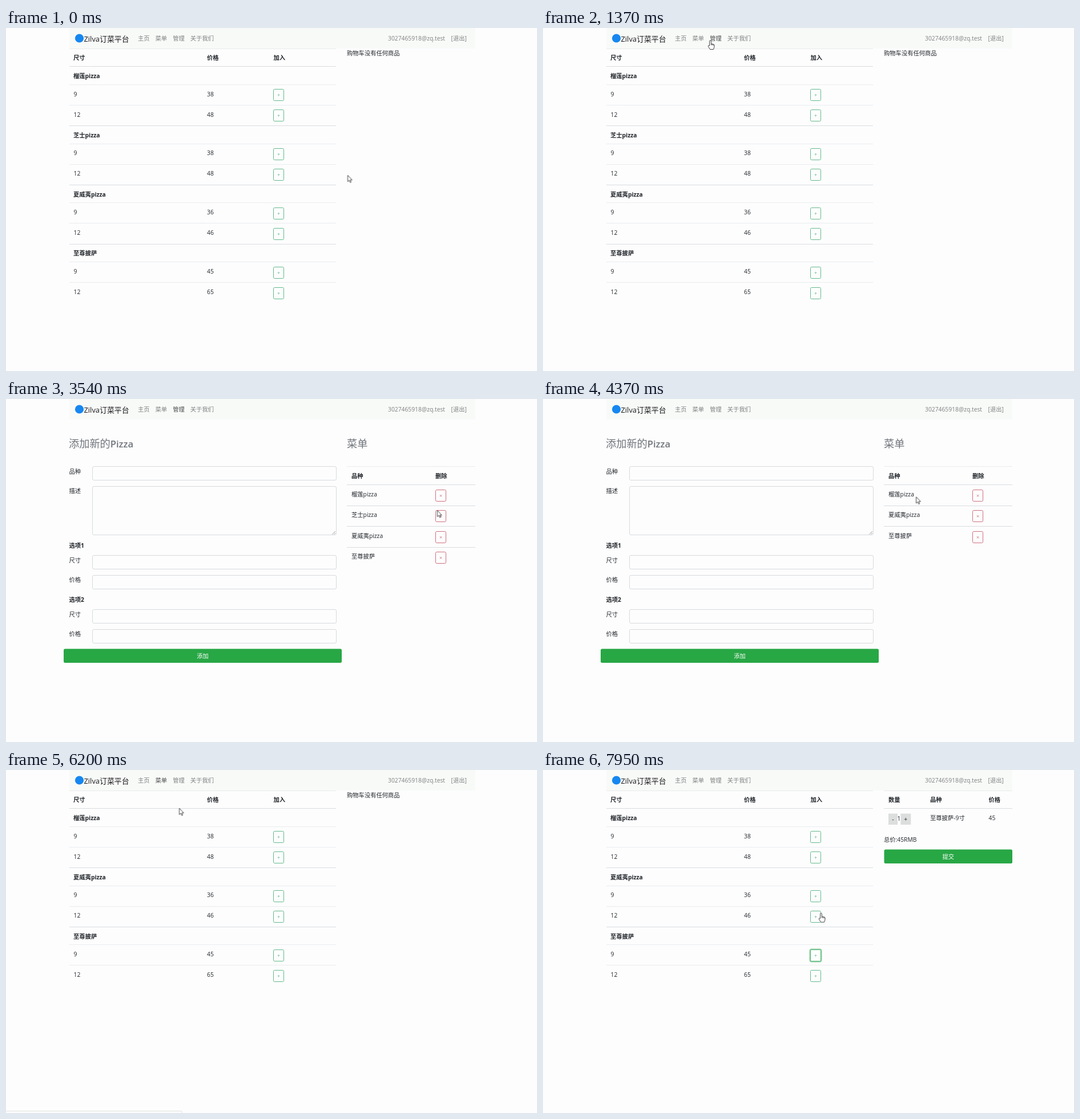
Animation of 930 by 602 pixels, one loop 8 s. Source, as an HTML page:

```html
<!DOCTYPE html>
<html lang="zh-CN">
<head>
<meta charset="utf-8">
<title>点餐</title>
<style>
html, body { margin: 0; width: 100%; height: 100%; overflow: hidden; background: #fdfdfe; }
svg { display: block; width: 930px; height: 602px; font: 10.3px 'Open Sans', 'Noto Sans CJK SC', sans-serif; fill: #212529; }
.b { font-weight: 700; }
.nav { fill: #7f8080; }
.bar { fill: #f8faf8; }
.title { font-size: 18.2px; fill: #70757a; }
.title tspan { font-size: 16.6px; font-weight: 600; }
.brand { font-size: 12.9px; fill: #1b1c1c; }
.mid { text-anchor: middle; }
.line { stroke: #eaecee; }
.thick { stroke: #d9dcdf; }
.field { fill: #fdfdfe; stroke: #d6dadb; }
.solid { fill: #28a745; }
.white { fill: #fff; }
.add { --c: #28a745; --edge: #62b98a; }
.del { --c: #dc3545; --edge: #cf6f7c; }
.btn rect { fill: #fdfdfe; stroke: var(--edge); }
.btn text { fill: var(--edge); font-size: 9px; text-anchor: middle; }
.btn.full rect { fill: var(--c); stroke: var(--c); }
.btn.full text { fill: #fff; }
.ring { fill: none; stroke: var(--c); stroke-opacity: .5; stroke-width: 2; }
.step { fill: #dcdddd; }
.status { fill: #fbfbfb; stroke: #e0e2e0; }
.pointer { stroke: #2b2b2b; stroke-width: .9; fill: #fff; stroke-linejoin: round; }

/* timed parts: hard switches on one 8 s clock */
.on { visibility: hidden; }
.on, .link { animation: 8s step-end infinite; }
.menu-old { animation-name: menu-old; }
.manage { animation-name: manage; }
.list-old { animation-name: list-old; }
.list-new { animation-name: list-new; }
.menu-new { animation-name: menu-new; }
.no-cart { animation-name: no-cart; }
.cart { animation-name: cart; }
.link-manage { animation-name: link-manage; }
.link-menu { animation-name: link-menu; }
.bubble { animation-name: bubble; }
.hover-del { animation-name: hover-del; }
.focus-del { animation-name: focus-del; }
.hover-add { animation-name: hover-add; }
.hand { animation-name: hand; }
.arrow { animation-name: arrow; }
@keyframes menu-old { 0% { visibility: visible } 21.5%, 100% { visibility: hidden } }
@keyframes manage { 21.5% { visibility: visible } 69.25%, 100% { visibility: hidden } }
@keyframes list-old { 21.5% { visibility: visible } 50%, 100% { visibility: hidden } }
@keyframes list-new { 50% { visibility: visible } 69.25%, 100% { visibility: hidden } }
@keyframes menu-new { 69.25%, 100% { visibility: visible } }
@keyframes no-cart { 0%, 69.25% { visibility: visible } 21.5%, 91.6%, 100% { visibility: hidden } }
@keyframes cart { 91.6%, 100% { visibility: visible } }
@keyframes link-manage { 15.6% { fill: #484949 } 0%, 50%, 100% { fill: #7f8080 } }
@keyframes link-menu { 62.4% { fill: #484949 } 0%, 91.6%, 100% { fill: #7f8080 } }
@keyframes bubble { 18.5%, 69.5% { visibility: visible } 32.5%, 80.6%, 100% { visibility: hidden } }
@keyframes hover-del { 45.2% { visibility: visible } 51%, 100% { visibility: hidden } }
@keyframes focus-del { 46.2% { visibility: visible } 50%, 100% { visibility: hidden } }
@keyframes hover-add { 87% { visibility: visible } 94%, 100% { visibility: hidden } }
@keyframes hand {
  15.6%, 45.2%, 62.4%, 87%, 98%, 100% { visibility: visible }
  23.8%, 51%, 72.6%, 94% { visibility: hidden }
}
@keyframes arrow {
  0%, 23.8%, 51%, 72.6%, 94% { visibility: visible }
  15.6%, 45.2%, 62.4%, 87%, 98%, 100% { visibility: hidden }
}
.cursor { animation: travel 8s linear infinite; }
@keyframes travel {
  0%, .5% { transform: translate(598.5px, 258.5px); animation-timing-function: ease-in }
  10.4% { transform: translate(463px, 222px); animation-timing-function: ease-out }
  16.6%, 22.5% { transform: translate(293px, 22px); animation-timing-function: ease-in }
  29.6% { transform: translate(464.5px, 101.5px) }
  30.6% { transform: translate(485px, 146px); animation-timing-function: ease-out }
  41.1% { transform: translate(750px, 187px) }
  44.3% { transform: translate(755.5px, 195.5px) }
  46.2%, 50% { transform: translate(767px, 207px); animation-timing-function: ease-in }
  59.9% { transform: translate(365px, 82px); animation-timing-function: ease-out }
  65%, 70.5% { transform: translate(281px, 27.5px); animation-timing-function: ease-in }
  77.5% { transform: translate(303.5px, 67px) }
  78.6% { transform: translate(308px, 83px) }
  84% { transform: translate(512px, 285px); animation-timing-function: ease-out }
  88%, 92.5% { transform: translate(477px, 322px); animation-timing-function: ease-in-out }
  99%, 100% { transform: translate(487px, 251.5px) }
}
</style>
</head>
<body>
<svg id="stage" viewBox="0 0 930 602"></svg>
<script>
const pizzas = [['榴莲pizza', 38, 48], ['芝士pizza', 38, 48], ['夏威夷pizza', 36, 46], ['至尊披萨', 45, 65]];
const remaining = pizzas.filter((_, i) => i !== 1);

// strokes sit on pixel centres, text on whole baselines
const crisp = v => Math.floor(v) + .5;
// y is the vertical middle of the text
const text = (x, y, s, cls = '') => `<text x="${x}" y="${Math.round(y + 3.8)}" class="${cls}">${s}</text>`;
const box = (x, y, w, h, cls, r = 2.5) =>
  `<rect x="${x}" y="${y}" width="${w}" height="${h}" rx="${r}" class="${cls}"/>`;
const line = (x1, x2, y, cls = 'line') => `<path d="M${x1} ${crisp(y)}H${x2}" class="${cls}"/>`;
const group = (cls, ...parts) => `<g class="${cls}">${parts.join('')}</g>`;
const timed = (name, ...parts) => group('on ' + name, ...parts);

const button = (x, y, sign, cls) =>
  group('btn ' + cls, box(x, crisp(y), 18, 20, '', 2), `<text x="${x + 9}" y="${crisp(y) + 13.5}">${sign}</text>`);
const ring = (x, y, cls) => group(cls, box(x - 1, crisp(y) - 1, 20, 22, 'ring', 3));
const wideButton = (x, y, w, label) =>
  box(x, y, w, 24.5, 'solid') + text(x + w / 2, y + 12.5, label, 'mid white');

const menuTable = list =>
  line(111, 578, 36) + text(118, 52, '尺寸', 'b') + text(352, 52, '价格', 'b') + text(468.5, 52, '加入', 'b') +
  list.map(([name, small, large], i) => {
    const y = 67.9 + i * 103.8;
    const size = (top, inch, price) =>
      line(111, 578, top) + text(118.5, top + 16.5, inch) + text(352, top + 16.5, price) +
      button(468.5, top + 8.4, '+', 'add');
    return line(111, 578, y, 'thick') + text(118, y + 16.2, name, 'b') +
      size(y + 31.4, 9, small) + size(y + 67.4, 12, large);
  }).join('');

const deleteList = list => list.map(([name], i) => {
  const y = 150.5 + i * 36.5;
  return line(597, 822, y, 'thick') + text(605, y + 16.5, name) + button(752.5, y + 8.5, '×', 'del');
}).join('');

const field = (y, label, h = 24) => text(110.5, y + 8.3, label) + box(151.5, crisp(y), 427, h, 'field');

const manageForm =
  `<text x="110" y="85" class="title">添加新的<tspan>Pizza</tspan></text>` +
  `<text x="597" y="85" class="title">菜单</text>` +
  field(118.7, '品种') + field(153.3, '描述', 85) +
  '<path d="M571.5 237.5l5.5-5.5M574.5 237.5l2.5-2.5" stroke="#888" stroke-width=".8"/>' +
  text(110.5, 257, '选项1', 'b') + field(274.8, '尺寸') + field(309.3, '价格') +
  text(110.5, 352, '选项2', 'b') + field(369.8, '尺寸') + field(404.3, '价格') +
  wideButton(101, 438.5, 487, '添加') +
  line(597, 822, 118) + text(605, 135, '品种', 'b') + text(752, 135, '删除', 'b');

const cart =
  line(597, 822, 36) + line(597, 822, 67.9, 'thick') +
  text(605, 52, '数量', 'b') + text(678, 52, '品种', 'b') + text(780.5, 52, '价格', 'b') +
  box(605, 76.5, 16, 19.5, 'step', 0) + box(626.3, 76.5, 18, 19.5, 'step', 0) +
  text(613, 86.5, '-', 'mid') + text(620.6, 85.5, '1') + text(635.2, 86.5, '+', 'mid') +
  text(678, 84.5, '至尊披萨-9寸') + text(780.5, 84.5, '45') + text(597, 122, '总价:45RMB') +
  wideButton(597.5, 139.5, 224.5, '提交');

const navbar =
  box(111, 0, 711, 36, 'bar', 0) +
  '<circle cx="128.5" cy="18" r="7.6" fill="#1687f0"/>' +
  '<text x="136.5" y="23.5" class="brand">Zilva订菜平台</text>' +
  group('nav', text(231, 18, '主页'), text(261.5, 18, '菜单', 'link link-menu'),
    text(292.3, 18, '管理', 'link link-manage'), text(322.8, 18, '关于我们'),
    text(669, 18, '3027465918@zq.test'), text(779.5, 18, '[退出]'));

const cursor = group('cursor',
  timed('arrow', '<path class="pointer" d="M0 0V11.2L2.6 8.8 4.3 12.7 6 12 4.4 8.2H7.7Z"/>'),
  timed('hand', '<path class="pointer" d="M-1.4 9V1.3a1.4 1.4 0 0 1 2.8 0V5.6l4.2 1q1.7.5 1.6 2.3L6.6 12.6 5.5 15.6H-.3L-3.6 10.4q-.6-1.6.8-1.8L-1.4 9.6M1.4 5.6V8.2M3.4 6.2V8.4M5.4 6.7V8.8"/>'));

document.getElementById('stage').innerHTML =
  navbar +
  timed('menu-old', menuTable(pizzas)) +
  timed('menu-new', menuTable(remaining)) +
  timed('manage', manageForm) +
  timed('list-old', deleteList(pizzas)) +
  timed('list-new', deleteList(remaining)) +
  timed('no-cart', text(597, 44, '购物车没有任何商品')) +
  timed('cart', cart, ring(468.5, 315.3, 'add')) +
  timed('hover-del', button(752.5, 195.5, '×', 'del full')) +
  timed('focus-del', ring(752.5, 195.5, 'del')) +
  timed('hover-add', button(468.5, 315.3, '+', 'add full')) +
  timed('bubble', box(-4, 598.5, 312.5, 12, 'status', 2)) +
  cursor;
</script>
</body>
</html>
```
